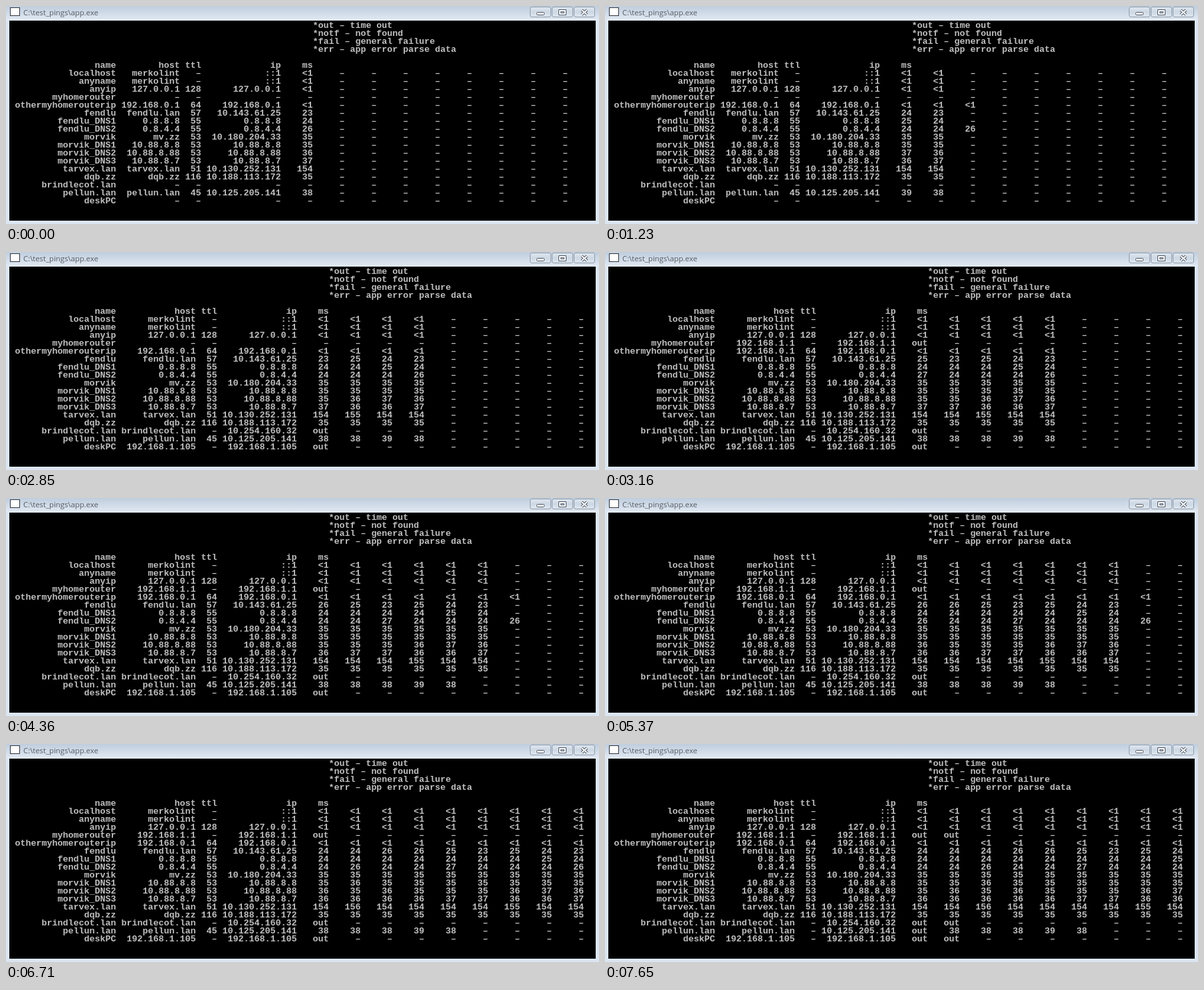
Animation, 892 px wide and 328 px high, one loop 8000 ms. Source, as an HTML page:

```html
<!DOCTYPE html>
<html lang="en">
<head>
<meta charset="utf-8">
<title>Ping monitor</title>
<style>
  html, body { margin: 0; width: 100%; height: 100%; overflow: hidden; background: #dbe6f2; }
  svg { display: block; }
  .title { font: 11.3px "Open Sans", "Noto Sans", sans-serif; fill: #565b63; }
  .console text {
    font: bold 13.333px "Liberation Mono", monospace;
    fill: #c0c0c0;
    white-space: pre;
  }
  .button { fill: url(#face); stroke: #8f9cab; }
  .glyph { fill: #fff; stroke: #4b5563; }
</style>
</head>
<body>
<svg width="892" height="328" viewBox="0 0 892 328">
  <defs>
    <linearGradient id="bar" x2="0" y2="1">
      <stop offset="0" stop-color="#bfcddd"/>
      <stop offset="1" stop-color="#e2eaf4"/>
    </linearGradient>
    <linearGradient id="face" x2="0" y2="1">
      <stop offset="0" stop-color="#dfe7f0"/>
      <stop offset=".5" stop-color="#cdd8e4"/>
      <stop offset="1" stop-color="#dfe8f1"/>
    </linearGradient>
    <rect id="button" class="button" x="-15.5" y="1.5" width="31" height="15" rx="2.5"/>
  </defs>
  <rect width="892" height="328" fill="#dbe6f2"/>
  <rect width="892" height="22" fill="url(#bar)"/>
  <rect x="6.5" y="2.5" width="14" height="12" fill="#fff" stroke="#30343c"/>
  <text class="title" x="26" y="14">C:\test_pings\app.exe</text>

  <g transform="translate(804)">
    <use href="#button"/>
    <rect class="glyph" x="-5.5" y="9.5" width="11" height="4" rx="1"/>
  </g>
  <g transform="translate(837)">
    <use href="#button"/>
    <path class="glyph" fill-rule="evenodd" d="M-5.5 5.5h11v8h-11zM-2.5 8.5h5v2h-5z"/>
  </g>
  <g transform="translate(870)">
    <use href="#button"/>
    <path d="M-4 6l8 7M4 6l-8 7" stroke="#4b5563" stroke-width="4"/>
    <path d="M-4 6l8 7M4 6l-8 7" stroke="#fff" stroke-width="2"/>
  </g>

  <rect x="5" y="22" width="882" height="301"/>
  <g class="console" id="console"></g>
</svg>
<script>
const LOOP = 8000;
const COLUMNS = 9;
const WIDEN_AT = 2850;
const ROUNDS = [210, 1230, 2130, 2850, 3660, 4360, 5370, 6390, 7330];
const DASH = "–";

const LEGEND = [
  `*out ${DASH} time out`,
  `*notf ${DASH} not found`,
  `*fail ${DASH} general failure`,
  `*err ${DASH} app error parse data`,
];

const same = value => Array(10).fill(value).join(" ");
const unreachable = ". . . . out . . . . out";

// name, host, ttl, ip, answers in order ("." = none that round), turn within a round
const ROWS = [
  ["localhost", "merkolint", DASH, "::1", same("<1"), 1],
  ["anyname", "merkolint", DASH, "::1", same("<1"), 1],
  ["anyip", "127.0.0.1", "128", "127.0.0.1", same("<1"), 1],
  ["myhomerouter", "192.168.1.1", DASH, "192.168.1.1", unreachable, 4],
  ["othermyhomerouterip", "192.168.0.1", "64", "192.168.0.1", same("<1"), 0],
  ["fendlu", "fendlu.lan", "57", "10.143.61.25", "23 24 25 23 25 26 26 24 24 24", 2],
  ["fendlu_DNS1", "0.8.8.8", "55", "0.8.8.8", "24 25 24 24 24 24 24 24 24 24", 2],
  ["fendlu_DNS2", "0.8.4.4", "55", "0.8.4.4", "26 24 24 24 27 24 24 26 24 24", 0],
  ["morvik", "mv.zz", "53", "10.180.204.33", same("35"), 2],
  ["morvik_DNS1", "10.88.8.8", "53", "10.88.8.8", "35 35 35 35 35 35 35 36 35 35", 3],
  ["morvik_DNS2", "10.88.8.88", "53", "10.88.8.88", "36 37 36 35 35 35 36 35 36 35", 3],
  ["morvik_DNS3", "10.88.8.7", "53", "10.88.8.7", "37 36 36 37 37 36 36 36 36 36", 3],
  ["tarvex.lan", "tarvex.lan", "51", "10.130.252.131", "154 154 155 154 154 154 154 156 154 154", 4],
  ["dqb.zz", "dqb.zz", "116", "10.188.113.172", same("35"), 3],
  ["brindlecot.lan", "brindlecot.lan", DASH, "10.254.160.32", unreachable, -1],
  ["pellun.lan", "pellun.lan", "45", "10.125.205.141", "38 39 38 38 38 . . . . out", 4],
  ["deskPC", "192.168.1.105", DASH, "192.168.1.105", unreachable, -1],
].map(([name, host, ttl, ip, answers, turn]) =>
  ({ name, host, ttl, ip, answers: answers.split(" "), turn }));

const consoleGroup = document.getElementById("console");
const lines = Array.from({ length: 6 + ROWS.length }, (_, i) => {
  const line = document.createElementNS("http://www.w3.org/2000/svg", "text");
  line.setAttribute("x", 5.5);
  line.setAttribute("y", 33 + 12 * i);
  return consoleGroup.appendChild(line);
});

function write(index, text) {
  if (lines[index].textContent !== text) lines[index].textContent = text;
}

// The fourth round starts one turn late; the fifth reaches every row at once.
function delay(round, turn) {
  if (round === 3) return 77.5 * Math.min(turn + 1, 4);
  return round === 4 ? 0 : 80 * Math.max(turn, 0);
}

function formatRow(cells, hostWidth) {
  const widths = [20, hostWidth, 4, 15];
  return cells.map((cell, i) => cell.padStart(widths[i] || 6)).join("");
}

function rowCells(row, time) {
  const done = 1 + ROUNDS.filter((start, i) => time >= start + delay(i, row.turn)).length;
  const seen = row.answers.slice(0, done).filter(a => a !== ".").reverse();
  const known = seen.length > 0;
  const history = Array.from({ length: COLUMNS }, (_, i) => seen[i] || DASH);
  return [
    row.name,
    known ? row.host : DASH,
    known && seen[0] !== "out" ? row.ttl : DASH,
    known ? row.ip : DASH,
    ...history,
  ];
}

function draw(time) {
  const hostWidth = time < WIDEN_AT ? 12 : 15;
  LEGEND.forEach((text, i) => write(i, " ".repeat(45 + hostWidth) + text));
  write(5, formatRow(["name", "host", "ttl", "ip", "ms"], hostWidth));
  ROWS.forEach((row, i) => write(6 + i, formatRow(rowCells(row, time), hostWidth)));
}

const start = performance.now();
function tick() {
  draw((performance.now() - start) % LOOP);
  requestAnimationFrame(tick);
}
tick();
</script>
</body>
</html>
```
